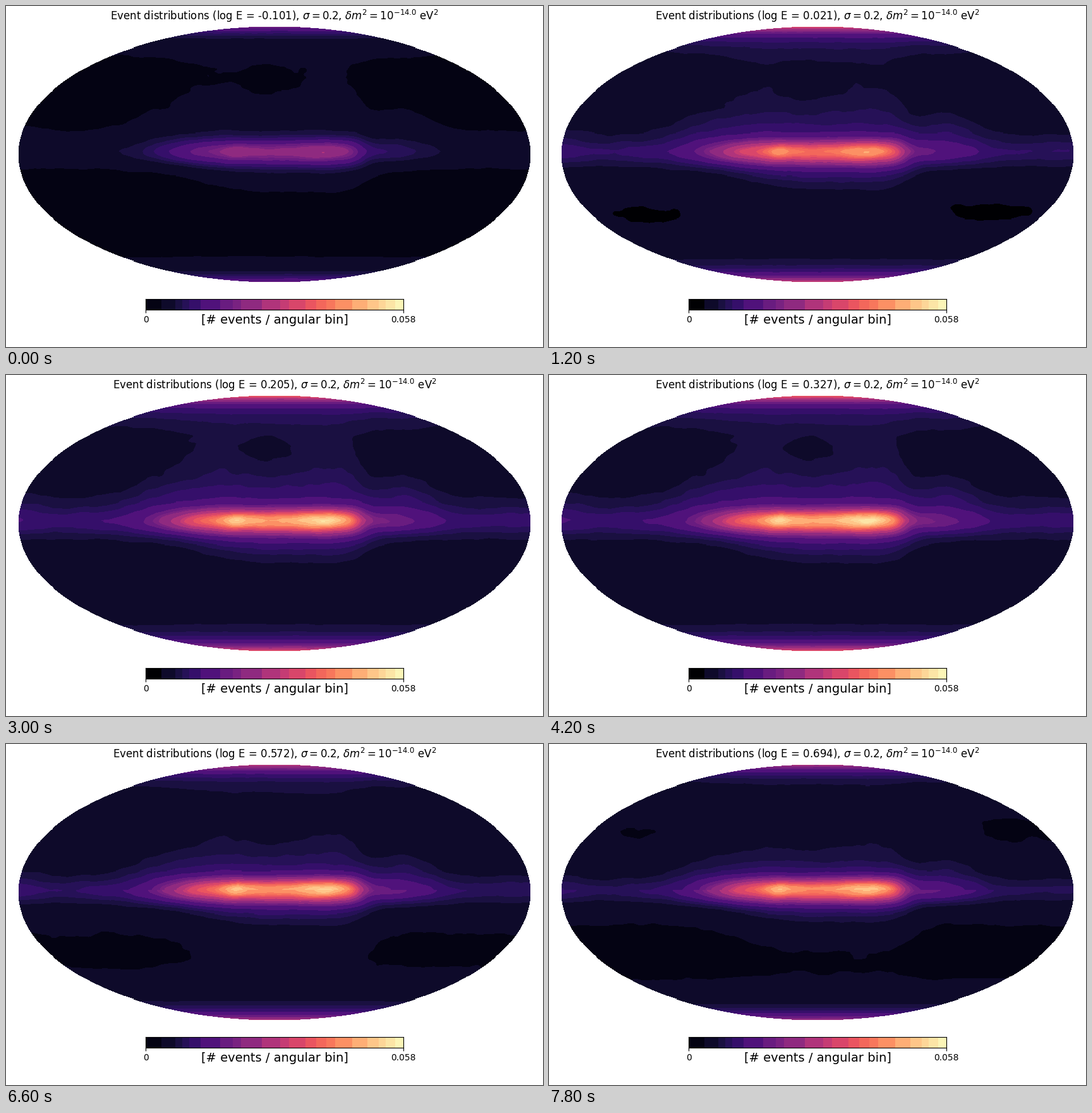
These frames come from a looping animation (850 by 540 pixels, 8 s). A matplotlib script:

```python
import numpy as np
import matplotlib.pyplot as plt
from matplotlib.animation import FuncAnimation

W, H = 850, 540
STEP_FRAMES = 3
MAP_BOX = (17, 99.9, 816, 410)       # left, bottom, width, height in pixels
BAR_BOX = (221, 59.28, 408, 16.32)
SCALE = 816 / 4.02                   # pixels per map unit
PLANE_Y = 231

plt.rcParams["font.family"] = "DejaVu Sans"

# The oval sky on an 800 x 400 grid, measured in stage pixels from the top left
u, v = np.meshgrid(np.linspace(-2, 2, 800), np.linspace(1, -1, 400))
inside = u ** 2 / 4 + v ** 2 <= 1
X = 425 + SCALE * u
Y = 235.1 - SCALE * v
north = Y < PLANE_Y


def shelf(left, soft_left, right, soft_right):
    """Plateau along the plane with soft ends."""
    rise = 1 / (1 + np.exp((left - X) / soft_left))
    return rise / (1 + np.exp((X - right) / soft_right))


def bump(x, sx):
    return np.exp(-((X - x) / sx) ** 2 / 2)


def blob(x, y, sx, sy):
    return bump(x, sx) * np.exp(-((Y - y) / sy) ** 2 / 2)


def smooth_noise(sx, sy, seed):
    rows, cols = X.shape
    white = np.random.default_rng(seed).normal(size=X.shape)
    fx = np.fft.fftfreq(cols)[None, :]
    fy = np.fft.fftfreq(rows)[:, None]
    low = np.exp(-2 * np.pi ** 2 * ((fx * sx) ** 2 + (fy * sy) ** 2))
    field = np.fft.ifft2(np.fft.fft2(white) * low).real
    return field / field.std()


# Brightness on the plane, reach of the northern halo, strength of the southern
peak = (0.18 + 0.60 * shelf(275, 36, 556, 11) + 0.13 * bump(605, 52)
        + 0.08 * bump(362, 13) + 0.08 * bump(500, 22) + 0.03 * bump(20, 25))
reach_n = (24 + 27 * shelf(260, 30, 560, 12) + 11 * bump(637, 33)
           + 4 * bump(350, 25) - 3 * bump(410, 25) + 5 * bump(505, 30))
power_s = 0.115 + 0.25 * shelf(320, 35, 565, 15)

dy = np.abs(Y - PLANE_Y)
blunt = np.hypot(dy, 8) - 8


def half_sky(floor, power, reach, sigma):
    """Halo and core on one side of the plane."""
    power = np.minimum(power, 0.92 * (peak - floor))
    halo = power * np.exp(-blunt / reach)
    core = (peak - floor - power) * np.exp(-(dy / sigma) ** 2 / 2)
    return halo, core


halo_n, core_n = half_sky(0.08, 0.2, reach_n, 12.5)
halo_s, core_s = half_sky(0.053, power_s, 31, 13.5)
grain = 1 + 0.014 * smooth_noise(12, 5, 4) + 0.008 * smooth_noise(5, 3, 9)
halo = np.where(north, halo_n, halo_s) * grain
core = np.where(north, core_n, core_s) * grain

top, bottom = np.maximum(Y - 33, 0), np.maximum(437 - Y, 0)
poles = np.where(north,
                 0.45 * np.exp(-top / 10) + 0.10 * np.exp(-top / 35),
                 0.40 * np.exp(-bottom / 10) + 0.13 * np.exp(-bottom / 45))

floor = np.where(north, 0.08, 0.049)
floor += 0.013 * blob(440, 76, 110, 13) - 0.011 * blob(417, 122, 36, 20)
floor -= 0.008 * blob(145, 148, 36, 22) + 0.011 * blob(730, 137, 55, 22)
floor -= 0.007 * (blob(165, 333, 45, 14) + blob(700, 330, 45, 14))
diffuse = floor * grain + poles

# Uneven colour bands of the scale
EDGES = np.array([.059, .113, .14, .167, .213, .289, .336, .37, .449, .52,
                  .554, .618, .66, .70, .735, .80, .858, .902, .93, .966])
shades = (np.r_[0, EDGES] + np.r_[EDGES, 1]) / 2
shades[1:3] = .08, .12


def palette(step):
    tones = shades.copy()
    tones[0] = 0 if 2 <= step <= 9 else 0.038
    return plt.get_cmap("magma")(tones)[:, :3]


def strengths(step):
    """Diffuse light rises and fades, the core rises and stays."""
    t = np.clip((step - 6.5) / 7.5, 0, 1)
    wide = 1.04 - 0.52 * np.exp(-step / 1.3) - 0.34 * t * t * (3 - 2 * t)
    narrow = 1.15 - 0.63 * np.exp(-step / 1.9)
    return wide, 0.7 * wide + 0.3 * narrow, narrow


def sky(step):
    a, b, c = strengths(step)
    value = a * diffuse + b * halo + c * core
    picture = palette(step)[np.digitize(value, EDGES)]
    picture[~inside] = 1
    return picture


def scale_bar(step):
    return palette(step)[np.digitize(np.arange(408) / 408, EDGES)][None]


def title_text(step):
    energy = round(-0.1012 + 0.0612 * step, 3)
    return (f"Event distributions (log E = {energy}), "
            r"$\sigma=0.2$, $\delta m^2=10^{-14.0}$ eV$^2$")


def add_box(left, bottom, width, height):
    return fig.add_axes([left / W, bottom / H, width / W, height / H])


fig = plt.figure(figsize=(W / 100, H / 100), dpi=100, facecolor="white")

ax = add_box(*MAP_BOX)
image = ax.imshow(sky(0), extent=(-2, 2, -1, 1), interpolation="nearest",
                  aspect="auto")
ax.set_xlim(-2.01, 2.01)
ax.set_ylim(-1.01, 1.01)
ax.axis("off")
title = ax.set_title(title_text(0), size=12)

bar_ax = add_box(*BAR_BOX)
bar = bar_ax.imshow(scale_bar(0), extent=(0, 0.058, 0, 1),
                    interpolation="nearest", aspect="auto")
bar_ax.set_yticks([])
bar_ax.set_xticks([0, 0.058], ["0", "0.058"], size=10)
bar_ax.text(0.5, -1, "[# events / angular bin]", size=14, ha="center",
            va="center", transform=bar_ax.transAxes)


def update(frame):
    step = frame // STEP_FRAMES
    image.set_data(sky(step))
    bar.set_data(scale_bar(step))
    title.set_text(title_text(step))
    return image, bar, title


anim = FuncAnimation(fig, update, frames=40, interval=200, repeat=True,
                     repeat_delay=0, blit=False)
plt.show()
```
